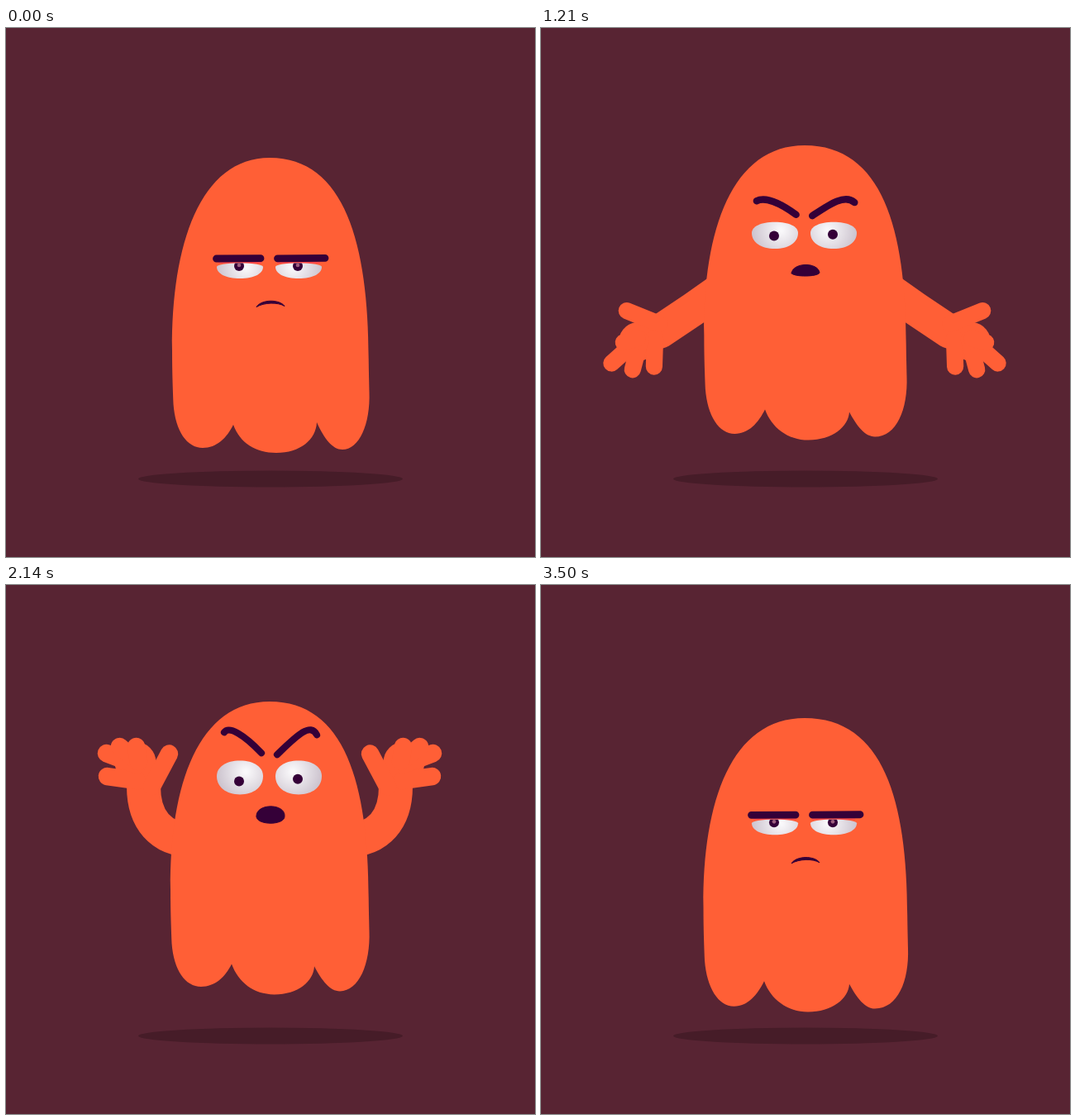
Animation, 640 px wide and 640 px high, one loop 3570 ms. Source, as an HTML page with a canvas:

```html
<!DOCTYPE html>
<html lang="en">
<head>
<meta charset="utf-8">
<title>Grumpy ghost</title>
<style>
html, body { margin: 0; width: 100%; height: 100%; overflow: hidden; background: #582433; }
canvas { display: block; width: 640px; height: 640px; }
</style>
</head>
<body>
<canvas id="stage" width="640" height="640"></canvas>
<script>
const ctx = document.getElementById('stage').getContext('2d');
const LOOP = 3570, STEP = 71.4, CYCLE = 11;
const BG = '#582433', SHADE = '#461c28', SKIN = '#ff5f36', INK = '#350038', LID = '#fb4a48';

const clamp = x => Math.max(0, Math.min(1, x));
const mix = (a, b, k) => a + (b - a) * k;
const mixAll = (a, b, k) => a.map((v, i) => mix(v, b[i], k));
const polar = (x, y, r, deg) => {
  const a = deg * Math.PI / 180;
  return [x + r * Math.cos(a), y + r * Math.sin(a)];
};

// Body wobble: drop of the crown per step, and offsets at a few keys:
// [left side, right side, left notch, right notch, left hem, other hems]
const CROWN = [0, 0, 0, 4.8, 1.6, 4.7, 3.5, 2.6, 5.4, 4.5, 3.7];
const KEYS = [0, 3, 5, 8, 11];
const WOBBLE = [
  [0, 0, 0, 0, 0, 0],
  [-2.5, 1, -5, 0, 0, 2.8],
  [-4.5, 4.5, -5, -3, 2.5, 3.2],
  [-2, 0, -2, -3, -0.6, 2.8],
  [0, 0, 0, 0, 0, 0]
];

function wobbleAt(phase) {
  let i = 0;
  while (phase >= KEYS[i + 1]) i++;
  return mixAll(WOBBLE[i], WOBBLE[i + 1], (phase - KEYS[i]) / (KEYS[i + 1] - KEYS[i]));
}

function drawBody(phase) {
  const top = 157 + CROWN[phase];
  const [l, r, n, m, hl, h] = wobbleAt(phase);
  const mid = (n + m) / 2;
  ctx.fillStyle = SKIN;
  ctx.beginPath();
  ctx.moveTo(319, top);
  ctx.bezierCurveTo(235 + l, top, 200 + l, 262, 201 + l, 390);
  ctx.bezierCurveTo(201 + l, 420, 202 + l, 440, 202.5 + l, 455);
  ctx.bezierCurveTo(205 + l, 488, 219 + l, 508 + hl, 238 + l, 508 + hl);
  ctx.bezierCurveTo(255 + l, 508 + hl, 267 + n, 496, 275 + n, 480);
  ctx.bezierCurveTo(283 + n, 502, 302 + mid, 514 + h, 327 + mid, 514 + h);
  ctx.bezierCurveTo(356 + mid, 514 + h, 375 + m, 498 + h, 376 + m, 477 + 2 * h);
  ctx.bezierCurveTo(385 + m, 497 + h, 395 + m, 510 + h, 407 + m, 510 + h);
  ctx.bezierCurveTo(427 + r, 510 + h, 441 + r, 480, 439.5 + r, 440);
  ctx.bezierCurveTo(439.2 + r, 425, 439 + r, 420, 438.7 + r, 400);
  ctx.bezierCurveTo(438.5 + r, 262, 410 + r, top, 319, top);
  ctx.fill();
}

function stick(x1, y1, x2, y2) {
  ctx.beginPath();
  ctx.moveTo(x1, y1);
  ctx.lineTo(x2, y2);
  ctx.stroke();
}

// tuck: 0 raised, 1 folded behind the body
function drawArm(tuck, step) {
  const sx = 225, sy = 330;
  const [ex, ey] = polar(sx, sy, mix(58.5, 42, tuck), mix(180, 120, tuck));
  const [wx, wy] = polar(ex, ey, mix(65, 40, tuck), mix(270, 65, tuck));
  ctx.strokeStyle = ctx.fillStyle = SKIN;
  ctx.lineCap = 'round';
  ctx.lineWidth = 41;
  ctx.beginPath();
  ctx.moveTo(sx, sy);
  ctx.bezierCurveTo(mix(sx, ex, .64), mix(sy, ey, .64), mix(wx, ex, .62), mix(wy, ey, .62), wx, wy);
  ctx.stroke();

  const curl = clamp(1 - Math.abs(step - 30) / 5);
  const spread = clamp((step - 30) / 5);
  const size = mix(1, .9, tuck);
  ctx.save();
  ctx.translate(wx, wy);
  ctx.rotate(-160 * tuck * Math.PI / 180);
  ctx.scale(size, size);
  ctx.lineWidth = 21.5;
  ctx.beginPath();
  ctx.arc(-10, -29, 25, 0, Math.PI * 2);
  ctx.fill();
  stick(-8, -7, -44, -12);
  stick(-8, -26, -45, -40);
  stick(-8, -30, mix(-34, -29, curl), mix(-66, -48, curl));
  stick(-6, -30, mix(-9, -6, spread), mix(-48, -60, spread));
  stick(10, 0, mix(31, 22, spread), mix(-39.5, -42, spread));
  ctx.restore();
}

function drawArms(step) {
  const tuck = step < 28 ? (20 - step) / 5 : (step - 36) / 5;
  if (tuck > 1) return;
  const k = clamp(tuck);
  drawArm(k, step);
  ctx.save();
  ctx.translate(638, 0);
  ctx.scale(-1, 1);
  drawArm(k, step);
  ctx.restore();
}

function drawEye(cx, px, pyOpen, open) {
  const y = mix(289, 233, open);
  const up = mix(4.5, 26.5, open), down = mix(14, 26.5, open);
  const w = 28, k = .6;
  if (open < .2) {
    ctx.strokeStyle = LID;
    ctx.lineWidth = 2;
    stick(cx - 26, 284, cx + 26, 284);
  }
  ctx.save();
  ctx.beginPath();
  ctx.moveTo(cx - w, y);
  ctx.bezierCurveTo(cx - w, y - up * k, cx - w * k, y - up, cx, y - up);
  ctx.bezierCurveTo(cx + w * k, y - up, cx + w, y - up * k, cx + w, y);
  ctx.bezierCurveTo(cx + w, y + down * k, cx + w * k, y + down, cx, y + down);
  ctx.bezierCurveTo(cx - w * k, y + down, cx - w, y + down * k, cx - w, y);
  const gx = mix(cx, 319, .2), gy = y - 8 * open;
  const glow = ctx.createRadialGradient(gx, gy, 2, gx, gy, 36);
  glow.addColorStop(0, '#f9f8fa');
  glow.addColorStop(1, '#cbc2cd');
  ctx.fillStyle = glow;
  ctx.fill();
  ctx.clip();
  const py = mix(288, pyOpen, open);
  ctx.fillStyle = INK;
  ctx.beginPath();
  ctx.arc(px, py, 6, 0, Math.PI * 2);
  ctx.fill();
  if (open < .3) {
    ctx.fillStyle = '#9c6080';
    ctx.beginPath();
    ctx.arc(px, py - 1, 2.3, 0, Math.PI * 2);
    ctx.fill();
  }
  ctx.restore();
}

// Both shapes are given at the raised height; the brow sinks as the eye shuts.
function drawBrow(flat, angry, open) {
  const k = clamp(open / .6);
  const [x, y, ...curve] = mixAll(flat, angry, k);
  ctx.save();
  ctx.translate(0, 53 * (1 - open));
  ctx.strokeStyle = INK;
  ctx.lineCap = 'round';
  ctx.lineWidth = mix(8.8, 8.2, k);
  ctx.beginPath();
  ctx.moveTo(x, y);
  ctx.bezierCurveTo(...curve);
  ctx.stroke();
  ctx.restore();
}

function drawMouth(open) {
  const v = (shut, wide) => mix(shut, wide, open);
  const l = v(337.5, 282), r = v(336.5, 282), top = v(328, 262);
  ctx.fillStyle = ctx.strokeStyle = INK;
  ctx.lineWidth = 1;
  ctx.beginPath();
  ctx.moveTo(303, l);
  ctx.bezierCurveTo(v(309, 298), top, v(331, 342), top, 337, r);
  ctx.bezierCurveTo(v(329, 342), v(331.5, 302), v(312, 298), v(332, 302), 303, l);
  ctx.fill();
  ctx.stroke();
}

function drawFace(step) {
  const open = step < 26 ? clamp((step - 15) / 5) : clamp(1 - (step - 28) / 5.7);
  drawEye(283, 282, 243, open);
  drawEye(354, 353, 239, open);
  drawBrow([254.5, 226, 272, 226, 290, 225.8, 308, 225.7],
           [264, 181, 270, 173, 288, 184, 309, 206], open);
  drawBrow([328.5, 225.8, 348, 225.6, 367, 225.5, 386, 225.4],
           [328, 208, 350, 187, 368, 168, 376, 184], open);
  drawMouth(open);
}

function drift(step) {
  const speed = 24 / 22;
  return Math.max(-24, step < 25 ? -speed * step : -24 + speed * (step - 27.6));
}

function draw(now) {
  const step = Math.floor((now % LOOP + 5) / STEP) % 50;
  ctx.fillStyle = BG;
  ctx.fillRect(0, 0, 640, 640);
  ctx.fillStyle = SHADE;
  ctx.beginPath();
  ctx.ellipse(320, 545.5, 160, 10, 0, 0, Math.PI * 2);
  ctx.fill();
  ctx.save();
  ctx.translate(0, drift(step));
  drawArms(step);
  drawBody(step % CYCLE);
  drawFace(step);
  ctx.restore();
}

const start = performance.now();
function tick() {
  draw(performance.now() - start);
  requestAnimationFrame(tick);
}
tick();
</script>
</body>
</html>
```
